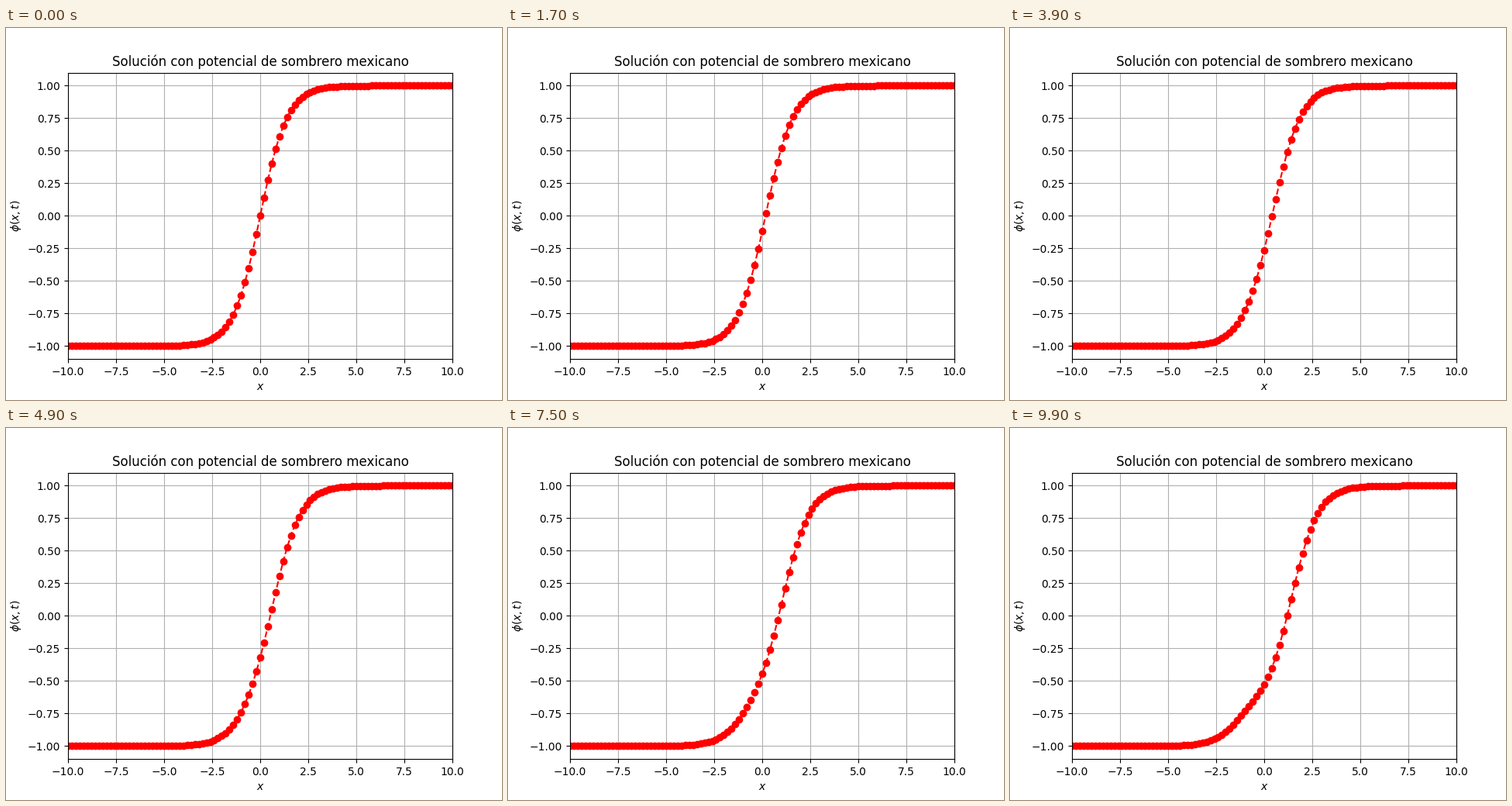
Write a matplotlib script that moves like this. It is 640 px wide and 480 px high and loops after 10 s.

```python
import numpy as np
import matplotlib.pyplot as plt
from matplotlib.animation import FuncAnimation

FRAMES, INTERVAL = 100, 100
DT = 0.01

x = np.linspace(-10, 10, 101)
dx = x[1] - x[0]


def accel(phi):
    """Field acceleration; both ends stay fixed."""
    a = np.zeros_like(phi)
    a[1:-1] = (phi[2:] - 2 * phi[1:-1] + phi[:-2]) / dx**2
    a[1:-1] += phi[1:-1]**3 - phi[1:-1]
    return a


def solve():
    """Leapfrog evolution of a kink launched to the right at unit speed."""
    phi = np.tanh(x / np.sqrt(2))
    vel = -(1 - phi**2) / np.sqrt(2)
    states = [phi, phi + DT * vel + DT**2 / 2 * accel(phi)]
    while len(states) < FRAMES:
        prev, cur = states[-2:]
        states.append(2 * cur - prev + DT**2 * accel(cur))
    return states


states = solve()

fig, ax = plt.subplots(figsize=(6.4, 4.8), dpi=100)
line, = ax.plot(x, states[0], "ro--")
ax.set_xlim(-10, 10)
ax.set_ylim(-1.1, 1.1)
ax.set_title("Solución con potencial de sombrero mexicano")
ax.set_xlabel("$x$")
ax.set_ylabel(r"$\phi(x,t)$")
ax.grid(True)


def update(i):
    line.set_ydata(states[i])
    return line,


anim = FuncAnimation(fig, update, frames=FRAMES, interval=INTERVAL,
                     repeat=True, repeat_delay=0)
plt.show()
```
